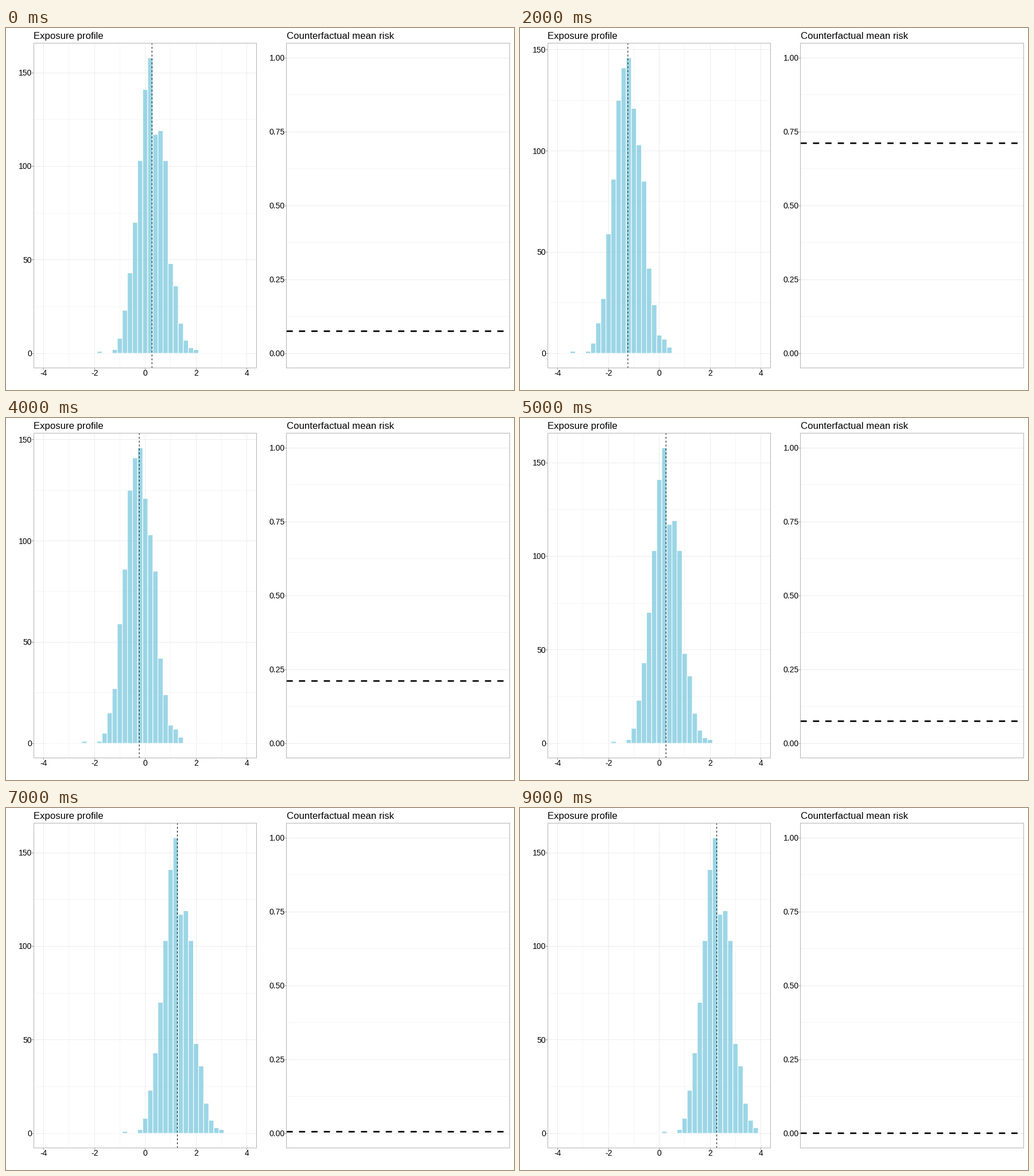
A matplotlib script that plays this animation: 885 px wide and 632 px high, repeating every 10000 ms.

```python
import numpy as np
import matplotlib.pyplot as plt
from matplotlib.animation import FuncAnimation
from matplotlib.patches import Rectangle

W, H, DPI = 885, 632, 100
PT = 72 / DPI  # points per pixel

TOP, BOTTOM = 26.2, 593.8
LEFT, RIGHT = (48.0, 437.2), (488.8, 878.0)
SPAN = (BOTTOM - TOP) / 1.1
ZERO = BOTTOM - 0.05 * SPAN
X0 = sum(LEFT) / 2
UNIT = (LEFT[1] - LEFT[0]) / 8.8
BIN = 0.2

# Histogram counts: (offset of first bin centre from the shift, counts)
WHOLE = (-1.8, [1, 0, 0, 2, 8, 23, 43, 70, 103, 141, 158, 117, 119, 103,
                48, 36, 16, 7, 3, 2])
HALF = (-1.9, [1, 0, 0, 1, 5, 15, 27, 59, 86, 125, 141, 146, 121, 103,
               85, 42, 24, 9, 7, 3])
MEAN = 0.264

SHIFTS = [0, -2, -1.5, -1, -0.5, 0, 0.5, 1, 1.5, 2]
RISK = {-2: 0.8857, -1.5: 0.711, -1: 0.4535, -0.5: 0.211, 0: 0.075,
        0.5: 0.0217, 1: 0.0055, 1.5: 0.0015, 2: 0.0004}

MAJOR, MINOR = "#ececec", "#f5f5f5"
BORDER, TICK = "#b3b3b3", "#8c8c8c"

plt.rcParams["font.family"] = "Liberation Sans"
fig = plt.figure(figsize=(W / DPI, H / DPI), dpi=DPI, facecolor="white")
ax = fig.add_axes([0, 0, 1, 1])
ax.set_xlim(0, W)
ax.set_ylim(H, 0)
ax.axis("off")


def px(v):
    """Centre of the pixel holding v."""
    return np.floor(v) + 0.5


def line(xs, ys, color, width=1.0, z=1, **kw):
    item, = ax.plot(xs, ys, color=color, lw=width * PT, zorder=z,
                    solid_capstyle="butt", dash_capstyle="butt", **kw)
    item.set_snap(False)
    return item


def label(x, y, s, size=14, ha="left"):
    return ax.text(x, y, s, fontsize=size * PT, ha=ha, va="baseline",
                   color="black", zorder=6)


def border(sides):
    x0, x1 = px(sides[0]), px(sides[1] - 0.5)
    y0, y1 = px(TOP), px(BOTTOM)
    box = Rectangle((x0, y0), x1 - x0, y1 - y0, fill=False,
                    ec=BORDER, lw=PT, zorder=5)
    box.set_snap(False)
    ax.add_patch(box)


def row(sides, color, text=None):
    """Horizontal grid line, with tick and label when text is given."""
    z = 1.5 if text else 1
    parts = [line(sides, (0, 0), color, z=z)]
    if text:
        parts.append(line((sides[0] - 3, sides[0]), (0, 0), TICK, 0.9, 5))
        parts.append(label(sides[0] - 2.8, 0, text, ha="right"))
    return parts


def place(parts, y):
    for part in parts[:2]:
        part.set_ydata([px(y)] * 2)
    if len(parts) > 2:
        parts[2].set_y(y + 5)


# Left panel
label(48, 19, "Exposure profile", 16.8)
border(LEFT)
for v in range(-4, 5):
    x = px(X0 + v * UNIT)
    major = v % 2 == 0
    line((x, x), (TOP, BOTTOM), MAJOR if major else MINOR, z=1.2 if major else 1)
    if major:
        line((x, x), (BOTTOM, BOTTOM + 3), TICK, 0.9, 5)
        label(X0 + v * UNIT, 607, str(v), ha="center")

rows = {v: row(LEFT, MINOR if v % 50 else MAJOR, None if v % 50 else str(v))
        for v in range(0, 151, 25)}

centres = np.arange(-19, 20) * BIN
bars = []
for c in centres:
    bar = Rectangle((X0 + (c - BIN / 2) * UNIT, ZERO), BIN * UNIT, 0,
                    fc=(0.357, 0.737, 0.839, 0.6), ec="white",
                    lw=1.07 * PT, zorder=3)
    bar.set_snap(False)
    bars.append(ax.add_patch(bar))

mean_line = line((X0, X0), (BOTTOM, TOP), "black", 1.0, 4,
                 linestyle=(0, (3.4, 3.4)))

# Right panel
label(488.8, 19, "Counterfactual mean risk", 16.8)
border(RIGHT)
for k in range(9):
    v = k / 8
    text = None if k % 2 else f"{v:.2f}"
    place(row(RIGHT, MINOR if k % 2 else MAJOR, text), ZERO - v * SPAN)
risk_line = line(RIGHT, (ZERO, ZERO), "black", 2.7, 4, linestyle=(0, (4, 4)))


def draw(i):
    shift = SHIFTS[i]
    start, counts = WHOLE if shift % 1 == 0 else HALF
    scale = SPAN / max(counts)
    first = round((start + shift) / BIN)
    for k, bar in enumerate(bars):
        j = k - 19 - first
        n = counts[j] if 0 <= j < len(counts) else 0
        bar.set_height(-n * scale)
    for v, parts in rows.items():
        place(parts, ZERO - v * scale)
    mean_line.set_xdata([X0 + (shift + MEAN) * UNIT] * 2)
    risk_line.set_ydata([ZERO - RISK[shift] * SPAN] * 2)
    return []


anim = FuncAnimation(fig, draw, frames=len(SHIFTS), interval=1000,
                     repeat=True, repeat_delay=0, blit=False)
plt.show()
```
